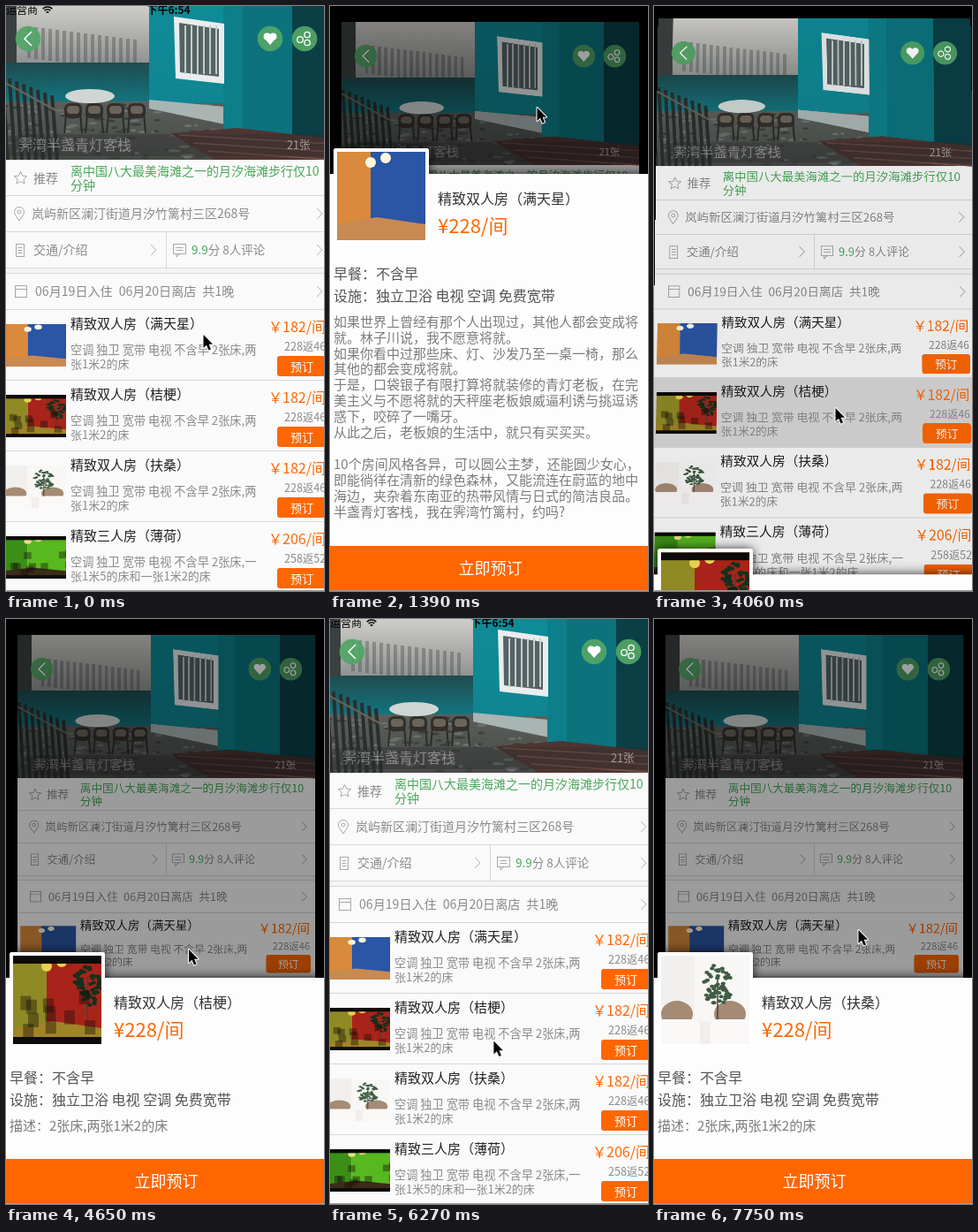
These frames come from a looping animation (360 px wide and 662 px high, 8000 ms). An HTML page with a canvas:

```html
<!DOCTYPE html>
<html lang="zh-CN">
<head>
<meta charset="utf-8">
<title>客栈预订</title>
<style>
html, body { margin: 0; width: 100%; height: 100%; overflow: hidden; background: #000; }
canvas { display: block; width: 100vw; height: 100vh; }
</style>
</head>
<body>
<canvas id="stage"></canvas>
<script>
const W = 360, H = 662, LOOP = 8000;
const FONT = '"Noto Sans CJK SC", "Noto Sans CJK", "Noto Sans", sans-serif';
const ORANGE = '#ff6600', GREEN = '#48a85a', GREY = '#8a8a8a', LINE = '#d8d8d8', ICON = '#a8a8a8';
// The phone screen is slightly larger than the stage.
const PAGE = { x: -6, y: -6, w: 375, h: 667, cx: 181.5, cy: 327.5 };
const ROWS_TOP = 343, ROW = 80, BOTTOM = 661;
const OPEN_MS = 500, CLOSE_MS = 400;
const FIRST_TICK = 500, TICK = 148.2;

const rooms = [
  { name: '满天星', price: 182, back: '228返46', walls: ['#d98a3c', '#2b55a5'],
    floor: '#c98a52', lamp: '#fff6e0' },
  { name: '桔梗', price: 182, back: '228返46', walls: ['#8f8a24', '#a8241a'],
    floor: '#a08428', lamp: '#e8cf52', plant: '#14301c', bands: true },
  { name: '扶桑', price: 182, back: '228返46', walls: ['#f1f0ee', '#f8f7f5'],
    floor: '#f3eeeb', plant: '#3f5c43', beds: true },
  { name: '薄荷', price: 206, back: '258返52', walls: ['#3c8f16', '#58b820'],
    floor: '#3a2c1a', lamp: '#e6e08a', bands: true, triple: true }
];
rooms.forEach(r => r.title = `精致${r.triple ? '三' : '双'}人房（${r.name}）`);

const story = [
  '如果世界上曾经有那个人出现过，其他人都会变成将',
  '就。林子川说，我不愿意将就。',
  '如果你看中过那些床、灯、沙发乃至一桌一椅，那么',
  '其他的都会变成将就。',
  '于是，口袋银子有限打算将就装修的青灯老板，在完',
  '美主义与不愿将就的天秤座老板娘威逼利诱与挑逗诱',
  '惑下，咬碎了一嘴牙。',
  '从此之后，老板娘的生活中，就只有买买买。',
  '',
  '10个房间风格各异，可以圆公主梦，还能圆少女心，',
  '即能徜徉在清新的绿色森林，又能流连在蔚蓝的地中',
  '海边，夹杂着东南亚的热带风情与日式的简洁良品。',
  '半盏青灯客栈，我在霁湾竹篱村，约吗?'
];

const visits = [
  { room: 0, press: 500, open: 560, close: 2368 },
  { room: 1, press: 3910, open: 3930, close: 5342 },
  { room: 2, press: 6720, open: 6629, close: Infinity }
];
const home = { x: 223, y: 372 };
const glides = [
  { from: 800, to: 1300, x: 234, y: 115 },
  { from: 2730, to: 3600, x: 205, y: 455 },
  { from: 4350, to: 4940, x: 208, y: 297 },
  { from: 5540, to: 6420, x: 177, y: 539 },
  { from: 7010, to: 7600, x: 231, y: 352 }
];

const clamp = v => Math.max(0, Math.min(1, v));
const smooth = v => v * v * (3 - 2 * v);
const seeded = n => () => (n = n * 16807 % 2147483647) / 2147483647;

// The screen refreshes in even steps, rounded to 10 ms.
function held(t) {
  const n = Math.floor((t - FIRST_TICK + 5) / TICK);
  return n < 0 ? 0 : FIRST_TICK + Math.round(n * TICK / 10) * 10;
}

const canvas = document.getElementById('stage');
const main = canvas.getContext('2d');
const dpr = window.devicePixelRatio || 1;
canvas.width = W * dpr;
canvas.height = H * dpr;

const buffer = document.createElement('canvas');
buffer.width = PAGE.w * 2;
buffer.height = PAGE.h * 2;
const back = buffer.getContext('2d');
let g = main;

function rect(color, x, y, w, h) {
  g.fillStyle = color;
  g.fillRect(x, y, w, h);
}
function fade(top, bottom, x, y, w, h) {
  const f = g.createLinearGradient(0, y, 0, y + h);
  f.addColorStop(0, top);
  f.addColorStop(1, bottom);
  rect(f, x, y, w, h);
}
function round(color, x, y, w, h, r) {
  g.fillStyle = color;
  g.beginPath();
  g.roundRect(x, y, w, h, r);
  g.fill();
}
function trace(pts) {
  g.beginPath();
  for (let i = 0; i < pts.length; i += 2) g.lineTo(pts[i], pts[i + 1]);
}
function poly(color, ...pts) {
  trace(pts);
  g.fillStyle = color;
  g.fill();
}
function stroke(color, width, ...pts) {
  trace(pts);
  g.strokeStyle = color;
  g.lineWidth = width;
  g.stroke();
}
function oval(color, x, y, rx, ry = rx) {
  g.fillStyle = color;
  g.beginPath();
  g.ellipse(x, y, rx, ry, 0, 0, 7);
  g.fill();
}
function arc(color, width, x, y, r, from = 0, to = 7) {
  g.strokeStyle = color;
  g.lineWidth = width;
  g.beginPath();
  g.arc(x, y, r, from, to);
  g.stroke();
}
function text(str, x, y, size, color, align = 'left', weight = 400) {
  g.font = `${weight} ${size}px ${FONT}`;
  g.textAlign = align;
  g.textBaseline = 'middle';
  g.fillStyle = color;
  g.fillText(str, x, y);
  return x + g.measureText(str).width;
}
function chevron(color, x, y, size, dir = 1) {
  stroke(color, size > 6 ? 1.5 : 1, x, y - size, x + size * dir, y, x, y + size);
}

function photo() {
  const rnd = seeded(11);
  fade('#d4d2ce', '#8d908e', -6, -6, 168, 74);
  rect('#3a4040', -6, -6, 18, 80);
  for (let x = 24; x < 150; x += 8) rect('rgba(70,76,74,.4)', x, 20 + x / 8, 4, 36);
  fade('#1f4b4f', '#127680', -6, 64, 168, 46);
  fade('#5a5f5b', '#474a47', -6, 108, 375, 66);
  for (let i = 0; i < 130; i++) {
    oval(i % 2 ? '#6b706b' : '#3d413e', rnd() * 260, 112 + rnd() * 60, 2 + rnd() * 5, 1.5);
  }
  for (let x = -6; x < 66; x += 8) stroke('#292f2e', 4, x - 6, 78 + x * 0.4, x, 174);
  stroke('#6b6156', 2, -6, 84, 60, 120);

  fade('#0f8c98', '#108592', 162, -6, 207, 116);
  poly('#a9b4b3', 162, 106, 248, 114, 248, 134, 162, 116);
  poly('#0d7f8a', 246, -6, 268, -6, 268, 146, 246, 140);
  poly('#0c737d', 268, -6, 324, -6, 324, 152, 268, 146);
  poly('#0a3f46', 324, -6, 369, -6, 369, 158, 324, 152);
  poly('#e9eded', 190, 12, 247, 20, 247, 88, 192, 82);
  poly('#566365', 196, 19, 241, 26, 241, 80, 197, 75);
  for (let x = 202; x < 241; x += 7) rect('#c2cccc', x, 22, 2, 55);
  poly('#4e3532', 186, 144, 262, 138, 369, 150, 369, 174, 236, 174);
  for (let i = 0; i < 3; i++) stroke('#7a5650', 1.5, 196 + i * 16, 146 + i * 9, 369, 156 + i * 9);

  oval('#cfd6d3', 95, 102, 28, 8);
  for (let i = 0; i < 4; i++) {
    const x = 76 + i * 24, y = 122;
    round('#332f2b', x - 10, y - 12, 20, 17, 6);
    round('#6b645a', x - 7, y - 9, 14, 9, 4);
    for (const side of [-1, 1]) stroke('#2e2b28', 2, x + side * 8, y, x + side * 10, y + 22);
  }
  rect('rgba(40,40,40,.35)', 4, 145, 365, 25);
  text('霁湾半盏青灯客栈', 14, 157, 16, 'rgba(255,255,255,.38)');
  text('21张', 318, 157, 12.5, 'rgba(255,255,255,.5)');
}

function roundButtons() {
  for (const x of [25, 299, 338]) oval('rgba(82,166,102,.93)', x, 37, 14.3);
  chevron('#fff', 29, 37, 8, -1);
  for (const side of [-1, 1]) {
    oval('#fff', 299 + side * 3.4, 34.5, 4);
    arc('#fff', 1.3, 341, 37 + side * 4.5, 3.2);
  }
  poly('#fff', 291.9, 36, 306.1, 36, 299, 44);
  arc('#fff', 1.3, 333, 38, 3.3);
}

function icons() {
  const star = [];
  for (let i = 0; i <= 10; i++) {
    const a = i * Math.PI / 5 - Math.PI / 2, r = i % 2 ? 3.6 : 7.5;
    star.push(16.5 + r * Math.cos(a), 195 + r * Math.sin(a));
  }
  stroke(ICON, 1, ...star);
  arc(ICON, 1, 15, 233, 5.5, 2.6, 0.54);
  arc(ICON, 1, 15, 233, 2);
  stroke(ICON, 1, 10.3, 236, 15, 243, 19.7, 236);
  g.strokeRect(11.5, 269.5, 9, 14);
  g.strokeRect(189.5, 269.5, 14, 11);
  g.strokeRect(10.5, 316.5, 13, 13);
  for (let y = 273.5; y < 281; y += 3) {
    stroke(ICON, 1, 13.5, y, 18.5, y);
    if (y < 279) stroke(ICON, 1, 192.5, y, 200.5, y);
  }
  stroke(ICON, 1, 193, 280.5, 193, 284, 197, 280.5);
  stroke(ICON, 1, 10.5, 320.5, 23.5, 320.5);
}

// A room in a 100 by 100 box: two walls, floor and a few props.
function picture(r, x, y, w, h) {
  const rnd = seeded(r.name.charCodeAt(0));
  g.save();
  g.beginPath();
  g.rect(x, y, w, h);
  g.clip();
  g.translate(x, y);
  g.scale(w / 100, h / 100);
  rect(r.walls[0], 0, 0, 38, 100);
  rect(r.walls[1], 38, 0, 62, 100);
  poly(r.floor, 0, 82, 45, 74, 100, 82, 100, 100, 0, 100);
  if (r.lamp) for (const i of [0, 1]) oval(r.lamp, 38 + i * 17, 12 - i * 5, 6);
  if (r.beds) {
    for (const bx of [18, 78]) {
      oval('#a58a74', bx, 66, 18, 15);
      round('#fbf9f8', bx - 22, 72, 48, 40, 8);
    }
  }
  if (r.plant) {
    const px = r.beds ? 64 : 84;
    stroke('#4b4036', 1.5, px, 72, px, 24);
    for (let i = 0; i < 60; i++) {
      const a = rnd() * 7, d = Math.sqrt(rnd());
      oval(r.plant, px + 16 * d * Math.cos(a), 34 + 24 * d * Math.sin(a), 2.6, 2);
    }
  }
  if (r.bands) {
    for (let i = 0; i < 10; i++) rect('rgba(20,14,8,.4)', rnd() * 100, 30 + rnd() * 50, 12, 16);
    for (const by of [0, 92]) rect('#0d0a0a', 0, by, 100, 9);
  }
  g.restore();
}

function roomRow(r, i) {
  const y = ROWS_TOP + i * ROW;
  picture(r, -2, y + 17, 70, 48);
  text(r.title, 73, y + 16, 15, '#222');
  text(`空调 独卫 宽带 电视 不含早 2张床,${r.triple ? '一' : '两'}`, 73, y + 46, 13.2, GREY);
  text(r.triple ? '张1米5的床和一张1米2的床' : '张1米2的床', 73, y + 62, 13, GREY);
  text(`￥${r.price}/间`, 297, y + 20, 16, ORANGE);
  text(r.back, 315, y + 42, 12.5, GREY);
  round(ORANGE, 307, y + 53, 56, 23, 3);
  text('预订', 335, y + 65, 13, '#fff', 'center');
  rect(LINE, PAGE.x, y + ROW, PAGE.w, 1);
}

function page(lit, glow) {
  rect('#fafafa', PAGE.x, PAGE.y, PAGE.w, PAGE.h);
  photo();
  roundButtons();
  rect('#f5f5f5', PAGE.x, 297, PAGE.w, 5);
  for (const y of [214, 255, 296, 302, ROWS_TOP]) rect(LINE, PAGE.x, y, PAGE.w, 1);
  rect(LINE, 181, 256, 1, 40);
  icons();
  text('推荐', 31, 194.5, 14, GREY);
  text('离中国八大最美海滩之一的月汐海滩步行仅10', 73, 186.5, 14, GREEN);
  text('分钟', 73, 203, 14, GREEN);
  text('岚屿新区澜汀街道月汐竹篱村三区268号', 29, 235, 14, GREY);
  text('交通/介绍', 31, 276, 14, GREY);
  text('分 8人评论', text('9.9', 210, 276, 13.5, GREEN), 276, 13.5, GREY);
  let x = 33;
  for (const part of ['06月19日入住', '06月20日离店', '共1晚']) x = text(part, x, 323, 14.1, GREY) + 7;
  chevron('#b5b5b5', 164, 276, 6);
  for (const y of [235, 276, 323]) chevron('#b5b5b5', 352, y, 6);
  g.globalAlpha = glow;
  rect('#d7d7d7', PAGE.x, ROWS_TOP + lit * ROW, PAGE.w, ROW);
  g.globalAlpha = 1;
  rooms.forEach(roomRow);
}

function statusBar() {
  text('运营商', 0, 4, 12, '#000');
  text('下午6:54', 184, 4, 12, '#000', 'center', 700);
  for (const r of [2, 5, 8]) arc('#000', 1.6, 47, 9, r, -2.3, -0.84);
}

// Tilts back first, then settles flat and smaller.
function pose(u) {
  if (u < 0.5) {
    return { deg: 10 * (2 * u) ** 1.5, s: 1 - 0.05 * (2 * u) ** 0.6, dy: 0 };
  }
  const q = 2 * u - 1;
  return { deg: 10 * (1 - q), s: 0.95 - 0.05 * q, dy: -9.35 * q };
}

function tiltedPage(u, lit, glow) {
  g = back;
  g.setTransform(2, 0, 0, 2, -2 * PAGE.x, -2 * PAGE.y);
  page(lit, glow);
  g = main;
  const { deg, s, dy } = pose(u);
  const a = deg * Math.PI / 180, k = s * Math.cos(a), c = Math.sin(a) / 900;
  const cy = PAGE.cy + dy;
  const source = y => (y - cy) / (k + c * (y - cy));
  for (let y = 0; y < BOTTOM; y++) {
    const top = source(y), next = source(y + 1);
    if (top < -PAGE.h / 2 || next > PAGE.h / 2) continue;
    const half = PAGE.w / 2 * s / (1 - c * top);
    g.drawImage(buffer, 0, (top + PAGE.h / 2) * 2, PAGE.w * 2, (next - top) * 2,
      PAGE.cx - half, y, half * 2, 1);
  }
}

function sheet(id, p) {
  const r = rooms[id], height = id === 0 ? 471 : 255;
  const top = BOTTOM + 30 - (height + 30) * p;
  const frame = () => round('#fff', 4, top - 29, 108, 108, 3);
  g.save();
  g.shadowColor = 'rgba(0,0,0,.8)';
  g.shadowBlur = 12 * dpr;
  rect('#fdfdfd', PAGE.x, top, PAGE.w, height + 30);
  g.beginPath();
  g.rect(0, 0, W, top);
  g.clip();
  frame();
  g.restore();
  frame();
  picture(r, 8, top - 25, 100, 100);
  text(r.title, 122, top + 28, 16, '#333');
  text('¥228/间', 122, top + 59, 22, ORANGE);
  text('早餐：不含早', 4, top + 113, 16, '#555');
  text('设施：独立卫浴 电视 空调 免费宽带', 4, top + 138, 16, '#555');
  const about = id === 0 ? story : ['描述：2张床,两张1米2的床'];
  about.forEach((s, i) => text(s, 4, top + 167 + i * 17.9, 15, '#7c7c7c'));
  rect(ORANGE, PAGE.x, top + height - 50, PAGE.w, 50);
  text('立即预订', PAGE.cx, top + height - 25, 18, '#fff', 'center');
}

function cursor(t) {
  let { x, y } = home;
  for (const m of glides) {
    const f = smooth(clamp((t - m.from) / (m.to - m.from)));
    x += (m.x - x) * f;
    y += (m.y - y) * f;
  }
  g.save();
  g.translate(x, y);
  trace([0.5, 0, 0.5, 15, 4, 11.7, 6.5, 17.5, 9, 16.4, 6.6, 10.8, 11, 10.8]);
  g.closePath();
  g.lineJoin = 'round';
  g.strokeStyle = '#fff';
  g.lineWidth = 2;
  g.stroke();
  g.fillStyle = '#000';
  g.fill();
  g.restore();
}

function draw(t) {
  g = main;
  g.setTransform(dpr, 0, 0, dpr, 0, 0);
  rect('#000', 0, 0, W, H);
  const visit = visits.find(v => t >= v.press && t < v.close + CLOSE_MS);
  let u = 0, slide = 0, glow = 0;
  if (visit && t < visit.close) {
    u = slide = clamp((t - visit.open) / OPEN_MS);
    glow = clamp(2 - 3.7 * u);
  } else if (visit) {
    slide = clamp(1 - (t - visit.close) / CLOSE_MS);
    u = clamp((slide - 0.12) / 0.88);
  }
  const lit = visit ? visit.room : 0;
  if (u > 0) tiltedPage(u, lit, glow);
  else page(lit, glow);
  statusBar();
  if (slide > 0) {
    const p = smooth(slide);
    if (u > 0) rect(`rgba(0,0,0,${0.38 * p})`, 0, 0, W, H);
    sheet(visit.room, p);
  }
  rect('#999', 0, BOTTOM, W, 1);
  cursor(t);
}

const start = performance.now();
let shown = -1;
function tick() {
  const t = held((performance.now() - start) % LOOP);
  if (t !== shown) draw(shown = t);
  requestAnimationFrame(tick);
}
tick();
</script>
</body>
</html>
```
